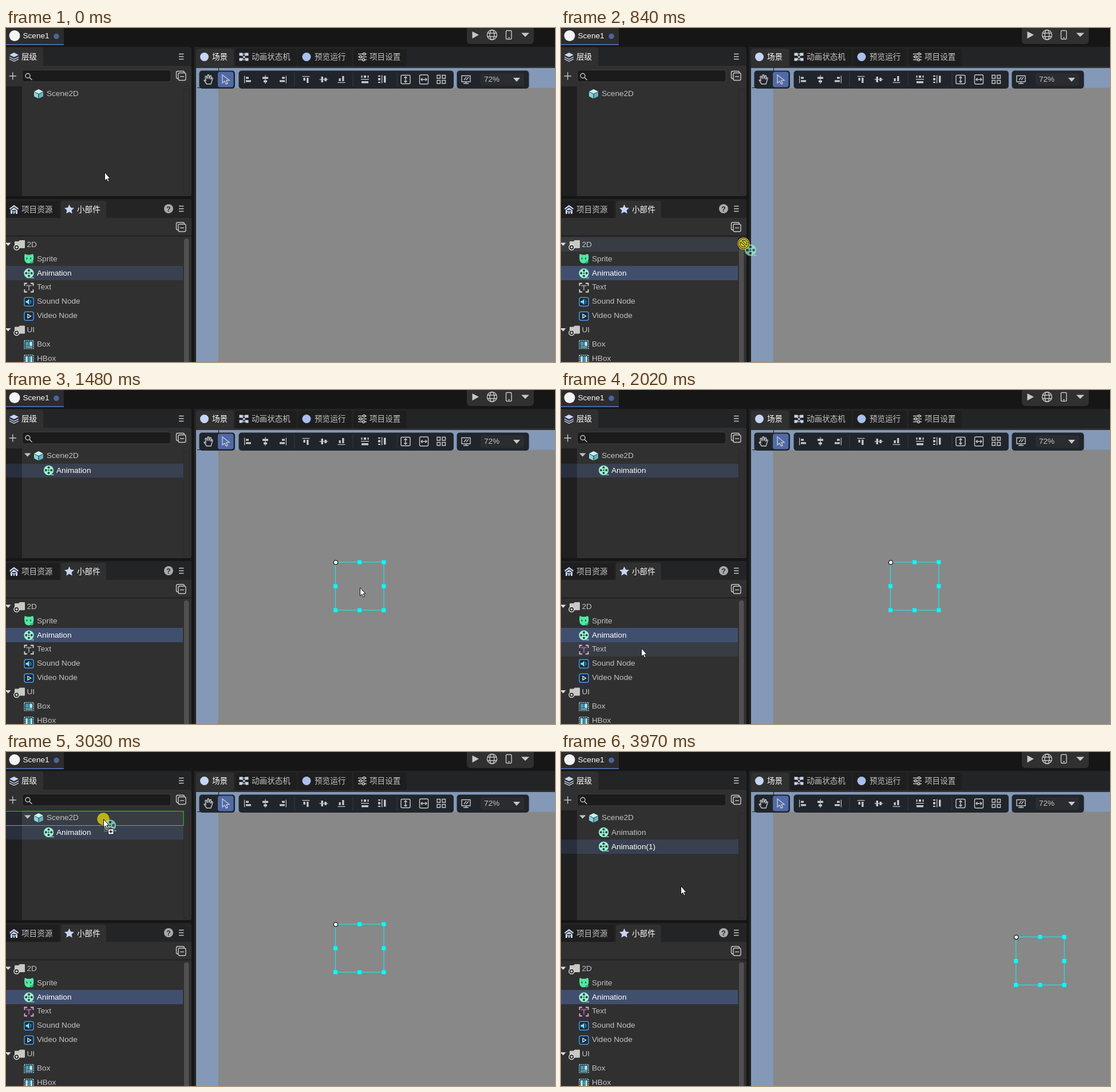
An HTML page that plays this animation: 959 px wide and 584 px high, repeating every 4.35 s.

```html
<!DOCTYPE html>
<html lang="zh">
<head>
<meta charset="utf-8">
<title>Scene editor</title>
<style>
html, body { margin: 0; width: 100%; height: 100%; overflow: hidden; background: #161616; }
svg { display: block; width: 959px; height: 584px; }
text { font: 13.6px "Liberation Sans", Arial, "Noto Sans CJK SC", "Noto Sans CJK", sans-serif; fill: #c3c3c3; }
.on { fill: #fff; }
.line { fill: none; stroke: #c8c8c8; stroke-width: 1.4; }
.soft { fill: #c8c8c8; }
.sky { fill: #c6d5f6; }
.panel { fill: #303030; }
.bar { fill: #232425; }
.tab { fill: #1e1e1e; }
.tool { fill: #20252b; }
.hidden { display: none; }
#textIcon { --edge: #dcdcdc; --ink: #969696; }
#textIcon.pink { --edge: #e9a9dc; --ink: #a8649c; }
</style>
</head>
<body>
<svg viewBox="0 0 959 584">
<defs>
  <g id="menu" class="line"><path d="M-4-4.5H4.500M-4 0H4.500M-4 4.500H4.500"/></g>
  <g id="fold" class="line">
    <path d="M-5 5H-6Q-8.500 5-8.500 2.500V-5.500Q-8.500-8-6-8H3Q5.500-8 5.500-5.500"/>
    <rect x="-5" y="-5" width="13" height="13" rx="2.500"/><path d="M-2 1.500H5"/>
  </g>
  <g id="reel">
    <path d="M3 8.600H9V7.400H6Z" fill="#9df0d3"/><circle r="8.600" fill="#9df0d3"/>
    <g fill="#25483f"><circle r="1.200"/><circle cy="-4.700" r="2"/><circle cx="4.700" r="2"/><circle cy="4.700" r="2"/><circle cx="-4.700" r="2"/></g>
  </g>
  <g id="folder">
    <path d="M-24-3.500H-14.500L-19.300 2Z" fill="#ddd"/>
    <path d="M-8-5Q-8-6-7-6H-1L1-8H9Q10-8 10-7V5Q10 6 9 6H-8Z" fill="#c9c9c4"/>
    <circle cx="-4.500" cy="4.500" r="4.500" fill="#303030" stroke="#ddd" stroke-width="1.500"/><circle cx="-4.500" cy="4.500" r="1.800" fill="#ddd"/>
  </g>
  <g id="cube">
    <path d="M0-8L8-4L0 0L-8-4Z" fill="#c4f3f6"/><path d="M-8-3.300L-.6.700V8.300L-8 4.500Z" fill="#8bd5de"/><path d="M8-3.300L.6.700V8.300L8 4.500Z" fill="#62b4c3"/>
  </g>
  <g id="arrow"><path d="M.5.500V15L3.700 12L6 17L8.200 16L6 11.200H10Z" fill="#fff" stroke="#111" stroke-width="1"/></g>
  <g id="alignSide" class="soft"><rect x="-6" y="-6.500" width="1.200" height="13"/><rect x="-3" y="-4.500" width="5" height="3.300"/><rect x="-3" y="1.200" width="9" height="3.300"/></g>
  <g id="alignMid" class="soft"><rect x="-.6" y="-7.500" width="1.200" height="15"/><rect x="-5" y="-4.500" width="10" height="3.500"/><rect x="-3" y="1.500" width="6" height="3.500"/></g>
  <g id="spread" class="soft"><rect x="-7" y="-1" width="14" height="1.300"/><rect x="-6" y="3" width="12" height="3.500"/><path d="M-6.500-7H-4.500V-3H-6.500ZM-2-7H2V-3H-2ZM4.500-7H6.500V-3H4.500Z"/></g>
  <g id="fit" class="line"><rect x="-8" y="-7.500" width="16" height="15" rx="2"/><path d="M0-5V5M-2.500-2.500L0-5L2.500-2.500M-2.500 2.500L0 5L2.500 2.500"/></g>
  <g id="frame"><rect x="-8" y="-7.500" width="16" height="15" rx="3" fill="#172b3c" stroke="#4a98e4" stroke-width="1.500"/></g>
  <g id="dashes"><rect x="-8" y="-7" width="16" height="14" fill="none" stroke="#8fdcef" stroke-width="1.500" stroke-dasharray="2 1.200"/></g>
  <g id="forbid" fill="none"><circle r="7.300"/><path d="M-5.200-5.200L5.200 5.200"/></g>
</defs>

<!-- title bar -->
<rect width="959" height="584" fill="#161616"/>
<rect width="101" height="29" fill="#2c2c2c"/><rect y="28" width="101" height="2" fill="#49679f"/>
<circle cx="15" cy="13.500" r="9.500" fill="#f4f4f4"/>
<text x="29.500" y="18" class="on">Scene1</text><circle cx="88" cy="14.500" r="4.800" fill="#4a659e"/>
<rect x="805" y="-6" width="117" height="34" rx="6" fill="#303030"/>
<path class="soft" d="M814.500 6L826 12L814.500 18.500Z M900 8.500H914L907 15.500Z"/>
<g class="line" transform="translate(849 12)"><circle r="8.500"/><ellipse rx="4" ry="8.500"/><path d="M-8-3H8M-8 3H8"/></g>
<rect class="line" x="873.500" y="4.500" width="9.500" height="15" rx="1.500"/><path class="line" d="M877 17H880"/>

<!-- hierarchy panel -->
<path class="bar" d="M0 33H320Q324 33 324 37V66H0Z"/><path class="panel" d="M0 34H61Q65 34 65 38V66H0Z"/>
<rect class="panel" y="66" width="324" height="228" rx="3"/><rect class="panel" y="66" width="30" height="30"/>
<rect y="102" width="28" height="192" fill="#1f1f1f"/>
<g class="sky"><path d="M14 43L22 47L14 51L6 47Z"/><path d="M6 50L14 54L22 50V51.500L14 55.500L6 51.500Z"/><path d="M6 53.500L14 57.500L22 53.500V55L14 59L6 55Z"/></g>
<text x="27" y="55" class="on">层级</text><use href="#menu" x="306" y="50"/>
<path class="line" d="M5.500 84H18M11.700 77.500V90.500"/>
<rect x="28.500" y="73.500" width="259.500" height="20.500" rx="4" fill="#1b1b1b" stroke="#3e3e3e"/>
<g class="line"><circle cx="38" cy="83.500" r="4"/><path d="M41 86.500L45.500 91"/></g>
<use href="#fold" x="306" y="83.500"/>
<rect x="310.500" y="106.500" width="10" height="185" rx="4" fill="none" stroke="#2a2a2a"/>

<!-- widget panel -->
<path class="bar" d="M0 299H320Q324 299 324 303V333H0Z"/><path class="tab" d="M0 302H89Q93 302 93 306V333H0Z"/>
<path class="panel" d="M96 333V306Q96 302 100 302H171Q175 302 175 306V333Z"/>
<rect class="panel" y="332" width="324" height="252"/>
<path d="M0 363.500H324" stroke="#1d1d1d" stroke-width="1.500"/>
<path class="sky" d="M6 315.500L14 309.500L22 315.500L21 317.500L14 312.500L7 317.500Z M8 318.500L14 314L20 318.500V325H8Z"/><path d="M10.500 318.500H17.500V320.500H10.500ZM11 322H13V325H11ZM15 322H17V325H15Z" fill="#1e1e1e"/>
<text x="27" y="322">项目资源</text>
<path class="sky" d="M110.500 308.500L113 314L119 314.700L114.600 318.700L115.700 324.500L110.500 321.600L105.300 324.500L106.400 318.700L102 314.700L108 314Z"/>
<text x="124" y="322" class="on">小部件</text>
<circle cx="284" cy="316" r="8" fill="#a9a9a9"/><text x="284" y="320.500" text-anchor="middle" style="font-size:12px;font-weight:bold;fill:#242424">?</text>
<use href="#menu" x="306" y="316"/><use href="#fold" x="306" y="348"/>
<rect x="311" y="368" width="8.500" height="230" rx="4" fill="#505050"/>

<g id="rows"></g>

<!-- widget icons and labels -->
<use href="#folder" x="23" y="379"/><use href="#folder" x="23" y="528.500"/>
<g id="labels"></g>
<path d="M32.500 395.500Q34 394.500 36.500 396.500H43Q45.500 394.500 47.500 395.500Q49 400 48 405Q46 411.500 40 411.500Q34 411.500 32.500 406Q31.500 400 32.500 395.500Z" fill="#50e9a3"/><path d="M36.500 401.500V404.500M43 401.500V404.500" stroke="#17553a" stroke-width="1.800"/><path d="M41.500 408H49L45 412.500Z" fill="#27b886"/>
<use href="#reel" x="40" y="428.800"/>
<g id="textIcon" transform="translate(40 454)" fill="none" stroke-width="1.800">
  <path d="M-3-7.500H-7.500V-3M3-7.500H7.500V-3M-7.500 3V7.500H-3M7.500 3V7.500H3" stroke="var(--edge)"/><path d="M-4.500-3.500H4.500M0-3.500V5" stroke="var(--ink)"/>
</g>
<use href="#frame" x="40" y="478.700"/><path d="M34.500 477H37L40.500 473.500V484L37 480.500H34.500Z" fill="#7fe1f1"/><path d="M42.500 475.500Q45 478.700 42.500 482" fill="none" stroke="#4a98e4" stroke-width="1.300"/>
<use href="#frame" x="40" y="503.700"/><path d="M38 500.500L43.500 503.700L38 507Z" fill="none" stroke="#e5f4ff" stroke-width="1.300"/>
<use href="#dashes" x="40" y="553.500"/><path d="M34 548.500H40V556H34Z" fill="#3f9dbb"/><path d="M41 548.500H46V556H41ZM34 557H46V558.500H34Z" fill="#a0e4f2"/>
<use href="#dashes" x="40" y="579"/><path d="M34 574H38V584H34ZM42.500 574H46V584H42.500Z" fill="#a0e4f2"/><path d="M38.700 574H41.800V584H38.700Z" fill="#3f9dbb"/>

<!-- hierarchy nodes -->
<use href="#cube" x="57" y="115"/><text x="71" y="119">Scene2D</text>
<g id="first"><path d="M32 110.500H43.500L37.700 116.500Z" fill="#c3c3c3"/><use href="#reel" x="74.500" y="140.300"/><text id="firstName" x="88" y="144.600">Animation</text></g>
<g id="second"><use href="#reel" x="74.500" y="165.200"/><text x="88" y="169.500" class="on">Animation(1)</text></g>

<!-- scene view -->
<rect class="bar" x="328.500" y="33" width="631" height="551"/>
<g class="tab"><rect x="401" y="36" width="107" height="31" rx="4"/><rect x="510" y="36" width="94" height="31" rx="4"/><rect x="607" y="36" width="93" height="31" rx="4"/></g>
<path class="panel" d="M332 70V40Q332 36 336 36H394Q398 36 398 40V67H959V70Z"/>
<circle cx="346.500" cy="50.500" r="7.500" fill="#c6d5f6"/><text x="360" y="55" class="on">场景</text>
<g transform="translate(415.500 50.500)"><path class="line" d="M-5-5L5-5L-4 5H5M-5-5L5 5"/><path class="sky" d="M-8-7H-2V-2H-8ZM2-7H8V-2H2ZM-8 2H-3V7H-8ZM3 2H8V7H3Z"/></g>
<text x="429" y="55">动画状态机</text>
<circle cx="525" cy="50.500" r="7.500" fill="#a9c0ee"/><text x="539" y="55">预览运行</text>
<g transform="translate(622.500 50.500)"><path class="line" d="M-7.500-5H7.500M-7.500 0H7.500M-7.500 5H7.500"/><g fill="#1e1e1e" stroke="#d3d3d3" stroke-width="1.400"><circle cx="3" cy="-5" r="2"/><circle cx="-3" r="2"/><circle cx="2" cy="5" r="2"/></g></g>
<text x="635" y="55">项目设置</text>
<rect x="332" y="70" width="627" height="514" fill="#8399b7"/><rect x="370.600" y="104.600" width="589" height="480" fill="#888"/>
<path d="M371.500 70V105M334 104.500H371" stroke="#111"/>
<g class="tool"><rect x="337.500" y="74.500" width="62.500" height="31.500" rx="5"/><rect x="406.500" y="74.500" width="375.500" height="31.500" rx="5"/><rect x="787.500" y="74.500" width="126" height="31.500" rx="5"/></g>
<rect x="370" y="76.500" width="27.500" height="27" rx="4" fill="#506aa9"/>
<path class="line" transform="translate(353.500 90)" d="M-3 8L-7.500 1.500Q-7 0-4.500 2L-5.500-5Q-4-7-3-4.500L-2-1L-1.500-7.500Q0-9 1-7.500V-1L3-6.500Q5-7.500 5-5L4 0L6-3Q8-3.500 7.500-1.500L4.500 8Z"/>
<path class="line" d="M378 82V96L382 93L384.500 98L387 97L385 92L390 91.500Z"/>
<use href="#alignSide" x="422" y="90"/><use href="#alignMid" x="453" y="90"/><use href="#alignSide" transform="translate(484 90) scale(-1 1)"/>
<use href="#alignSide" transform="translate(524 90) rotate(90) scale(1 -1)"/><use href="#alignMid" transform="translate(555 90) rotate(-90)"/><use href="#alignSide" transform="translate(586 90) rotate(-90)"/>
<use href="#spread" x="627" y="90"/><use href="#spread" transform="translate(657 89.500) rotate(-90)"/>
<use href="#fit" x="698" y="90"/><use href="#fit" transform="translate(730 90) rotate(90)"/>
<path class="line" d="M753 82.500H758.500V88H753ZM762 82.500H767.500V88H762ZM753 91.500H758.500V97H753ZM762 91.500H767.500V97H762Z"/>
<path d="M504 78V102M606 78V102M683 78V102" stroke="#343b42"/>
<path class="line" d="M796 83.500H811V94H796ZM799 97H808M803.500 94V97M800 91L804 86M804 91L808 86"/>
<rect x="829" y="79" width="76" height="22" rx="4" fill="#2a2c2f"/><text x="835" y="93.600">72%</text><path class="soft" d="M886 87H898L892 94Z"/>

<g id="selection"><rect x="575.500" y="301" width="84.500" height="84" fill="none" stroke="#1de5e8" stroke-width="1.200"/><g id="handles" fill="#0ff"></g><circle cx="576" cy="301.500" r="3.700" fill="#fff" stroke="#111" stroke-width="1.300"/></g>

<g id="pointer">
  <circle id="halo" r="10.700" fill="#fff000" fill-opacity=".66"/>
  <use id="ghost" href="#reel" transform="translate(12 11.300) scale(1.180)" opacity=".7"/>
  <g id="noDrop"><circle r="10.500" fill="#d6cc30"/><use href="#forbid" stroke="#292812" stroke-width="4"/><use href="#forbid" stroke="#e6db3a" stroke-width="1.800"/></g>
  <use id="plain" href="#arrow"/>
  <g id="copy">
    <rect x="2" y="13.500" width="9" height="8" fill="none" stroke="#ccc" stroke-dasharray="1 1"/>
    <use href="#arrow"/>
    <rect x="8.500" y="17.500" width="9.500" height="9.500" fill="#fff" stroke="#111"/><path d="M10.500 22.200H16M13.200 19.500V25" stroke="#111" stroke-width="1.400"/>
  </g>
</g>
</svg>
<script>
const LOOP = 4350, PITCH = 24.9, LIST_TOP = 366, TREE_TOP = 103.6;
const $ = id => document.getElementById(id);
const names = ["2D", "Sprite", "Animation", "Text", "Sound Node", "Video Node", "UI", "Box", "HBox"];

$("labels").innerHTML = names.map((name, i) =>
  `<text x="${name.length < 3 ? 36.5 : 54}" y="${382.7 + i * PITCH}" ${i === 2 ? 'class="on"' : ""}>${name}</text>`).join("");

for (let i = 0; i < 9; i++) {
  const x = i % 3, y = Math.floor(i / 3);
  if (i && i !== 4)
    $("handles").innerHTML += `<rect x="${572 + x * 42.2}" y="${297.5 + y * 42}" width="7" height="7"/>`;
}

// Each stretch: first time, last time, pointer mode, evenly timed stops.
const stretches = [
  [0, 0, "plain", [[172, 252]]],
  [70, 460, "plain", [[170, 262], [158, 308], [136, 362], [115, 405], [106, 426], [104, 431]]],
  [600, 600, "press", [[104, 431]]],
  [680, 840, "noDrop", [[142, 418], [225, 388], [319, 377]]],
  [930, 1100, "copy", [[442, 361], [565, 347], [619, 344]]],
  [1330, 1480, "plain", [[619, 344], [618, 345], [618, 345]]],
  [1710, 2100, "plain", [[555, 356], [405, 392], [250, 430], [140, 451], [100, 445], [90, 437]]],
  [2250, 2250, "press", [[90, 437]]],
  [2327, 2557, "noDrop", [[91, 430], [94, 415], [99, 396], [106.5, 360.5]]],
  [2633, 2710, "copy", [[137, 250], [168, 143]]],
  [2800, 3030, "copy", [[168, 126], [168, 113], [169, 110], [170, 117]]],
  [3180, 3650, "plain", [[170, 117], [170, 117], [170, 118], [172, 124], [177, 139], [186, 168], [196, 202]]],
  [3730, 3970, "plain", [[202, 215], [206, 226], [208, 232], [209, 234]]]
];
const stops = stretches.flatMap(([from, to, mode, points]) => points.map(([x, y], i) =>
  ({ t: from + (to - from) * i / Math.max(1, points.length - 1), mode, x, y })));

const show = (id, on) => $(id).classList.toggle("hidden", !on);

// Row edges sit on whole pixels.
function bar(top, i, width, fill) {
  const y = Math.round(top + i * PITCH), end = Math.round(top + (i + 1) * PITCH);
  return `<rect y="${y}" width="${width}" height="${end - y}" fill="${fill}"/>`;
}
const treeBar = (i, fill, side) => bar(TREE_TOP, i, 310, fill) + bar(TREE_TOP, i, 28, side);
const listBar = (i, fill) => bar(LIST_TOP, i, 309, fill);

function rowAt({ x, y }, nodes) {
  if (x > 310) return {};
  const tree = Math.floor((y - TREE_TOP) / PITCH), list = Math.floor((y - LIST_TOP) / PITCH);
  if (tree >= 0 && tree < nodes) return { tree };
  return list >= 0 ? { list } : {};
}

function draw(t) {
  const at = stops.findLastIndex(s => s.t <= t), stop = stops[at], { mode } = stop;
  const nodes = t < 1400 ? 1 : t < 3258 ? 2 : 3;
  const dragging = mode === "noDrop" || mode === "copy";
  // Row feedback trails the pointer by one step during a drag.
  const hover = rowAt(dragging ? stops[at - 1] : stop, nodes);

  let bars = "";
  if (hover.tree !== undefined) bars += treeBar(hover.tree, "#383c43", "#24282e");
  if (hover.list !== undefined) bars += listBar(hover.list, "#383c43");
  if (nodes > 1) bars += treeBar(nodes - 1, "#394050", "#282f3d");
  bars += listBar(2, t < 600 ? "#394050" : "#414f6f");
  if (mode === "copy" && hover.tree !== undefined)
    bars += `<rect x="-1" y="${Math.round(TREE_TOP + hover.tree * PITCH) - .5}" width="311" height="25" fill="none" stroke="#20df20"/>`;
  $("rows").innerHTML = bars;

  show("first", nodes > 1);
  show("second", nodes > 2);
  $("firstName").classList.toggle("on", nodes === 2);
  $("textIcon").classList.toggle("pink", t >= 1944);
  show("selection", t >= 1480);
  $("selection").setAttribute("transform", nodes > 2 ? "translate(219.2 22.300)" : "");

  $("pointer").setAttribute("transform", `translate(${stop.x} ${stop.y})`);
  show("halo", mode === "press" || mode === "copy");
  show("ghost", dragging);
  show("noDrop", mode === "noDrop");
  show("copy", mode === "copy");
  show("plain", mode === "plain" || mode === "press");
}

const start = performance.now();
function tick() {
  draw((performance.now() - start) % LOOP);
  requestAnimationFrame(tick);
}
tick();
</script>
</body>
</html>
```
